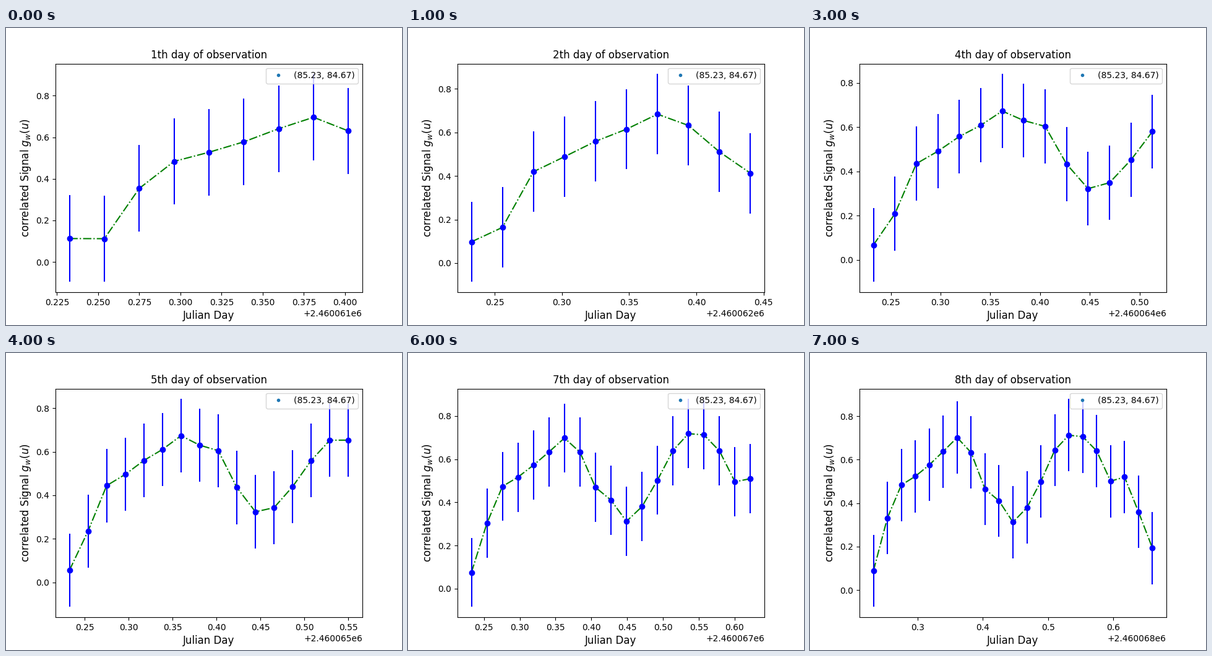
These frames come from a looping animation (640x480 px, 8000 ms). A matplotlib script:

```python
import numpy as np
import matplotlib.pyplot as plt
from matplotlib.animation import FuncAnimation

EPOCH = 2460060
START = 0.2326
ENDS = [.4021, .4403, .4768, .5130, .5500, .5860, .6220, .6597]
SAMPLES_PER_DAY = 48
DRIFT = 0.00273  # sidereal time gains this part of a day, every day

# The sky signal over sidereal time: one curve shared by all days
SKY_TIME, SKY_SIGNAL = np.array([
    (.2325, .113), (.2433, .0545), (.2514, .085), (.2602, .184),
    (.2750, .354), (.2823, .4275), (.2941, .483), (.3045, .488),
    (.3267, .557), (.3385, .578), (.3800, .702), (.3916, .630),
    (.4010, .633), (.4154, .5985), (.4223, .465), (.4440, .410),
    (.4551, .324), (.4655, .312), (.4763, .343), (.4869, .380),
    (.5186, .560), (.5295, .645), (.5330, .622), (.5398, .653),
    (.5550, .736), (.5610, .652), (.5770, .730), (.5940, .637),
    (.5990, .644), (.6155, .494), (.6370, .521), (.6786, .1925),
]).T

fig, ax = plt.subplots(figsize=(6.4, 4.8), dpi=100)


def observe(i):
    """Sample times and signal of one session."""
    count = int((ENDS[i] - START) * SAMPLES_PER_DAY) + 1
    t = np.linspace(START, ENDS[i], count)
    return t, np.interp(t + DRIFT * i, SKY_TIME, SKY_SIGNAL)


def draw(i):
    day = i + 1
    t, signal = observe(i)
    t = t + EPOCH + day

    ax.clear()
    ax.plot([], [], ".", color="C0", label="(85.23, 84.67)")
    ax.plot(t, signal, "g-.")
    ax.errorbar(t, signal, yerr=np.std(signal), fmt="bo")
    ax.set_title(f"{day}th day of observation")
    ax.set_xlabel("Julian Day", fontsize=12)
    ax.set_ylabel("correlated Signal $g_w(u)$", fontsize=12)
    ax.legend(loc="upper right")


anim = FuncAnimation(fig, draw, frames=len(ENDS), interval=1000, repeat=True)
plt.show()
```
